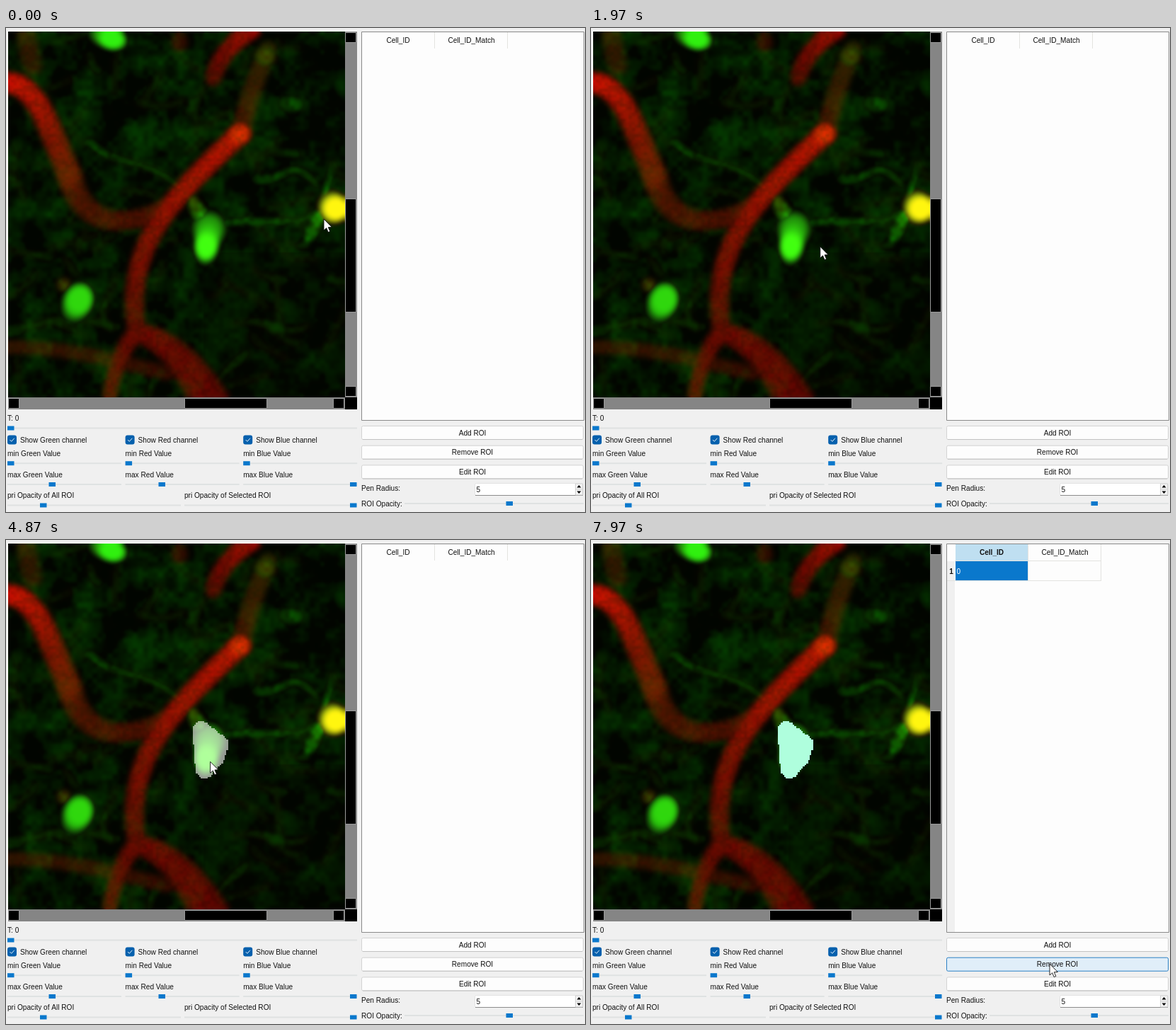
Animation, 818 px wide and 684 px high, one loop 8000 ms. Source, as an HTML page with a canvas:

```html
<!DOCTYPE html>
<html lang="en">
<head>
<meta charset="utf-8">
<title>ROI editor</title>
<style>
html, body { margin: 0; width: 100%; height: 100%; overflow: hidden; background: #f0f0f0; }
canvas { display: block; }
</style>
</head>
<body>
<canvas id="stage" width="818" height="684"></canvas>
<script>
const LOOP = 8000;
const ctx = document.getElementById('stage').getContext('2d');
const FONT = '10.1px "Liberation Sans", Arial, sans-serif';
const BLUE = '#0a78cc';
const VIEW = { x: 3, y: 5, w: 476, h: 517, cell: 2.39 };

// ---------- helpers ----------
function makeCanvas(w, h) {
  const c = document.createElement('canvas');
  c.width = w;
  c.height = h;
  return c;
}

function box(c, x, y, w, h, fill, stroke, r = 0) {
  c.beginPath();
  c.roundRect(x, y, w, h, r);
  if (fill) { c.fillStyle = fill; c.fill(); }
  if (stroke) { c.strokeStyle = stroke; c.lineWidth = 1; c.stroke(); }
}

function label(c, text, x, y, { align = 'left', color = '#111', bold = false } = {}) {
  c.font = (bold ? 'bold ' : '') + FONT;
  c.textAlign = align;
  c.textBaseline = 'alphabetic';
  c.fillStyle = color;
  c.fillText(text, x, y);
}

const mix = (a, b, u) => a + (b - a) * u;
const ease = u => u * u * (3 - 2 * u);

function hash(x, y, seed) {
  let h = Math.imul(x, 374761393) + Math.imul(y, 668265263) + Math.imul(seed, 1442695041);
  h = Math.imul(h ^ (h >>> 13), 1274126177);
  return ((h ^ (h >>> 16)) >>> 0) / 4294967296;
}

function noise(x, y, size, seed) {
  const ix = Math.floor(x / size), iy = Math.floor(y / size);
  const fx = ease(x / size - ix), fy = ease(y / size - iy);
  const row = j => mix(hash(ix, j, seed), hash(ix + 1, j, seed), fx);
  return mix(row(iy), row(iy + 1), fy);
}

// ---------- microscope picture ----------
const W = Math.ceil(VIEW.w / VIEW.cell), H = Math.ceil(VIEW.h / VIEW.cell);

// A cubic curve whose width and colour fade from one end to the other.
function tube(c, [a, b, d, e], width, red, green) {
  for (const [size, glow] of [[1, 0.55], [0.85, 0.8], [0.6, 1]]) {
    for (let u = 0; u <= 1; u += 0.01) {
      const v = 1 - u;
      const [x, y] = [0, 1].map(n =>
        v * v * v * a[n] + 3 * v * v * u * b[n] + 3 * v * u * u * d[n] + u * u * u * e[n]);
      c.fillStyle = `rgb(${mix(...red, u) * glow},${mix(...green, u) * glow},0)`;
      c.beginPath();
      c.arc(x, y, mix(...width, u) * size / 2, 0, 7);
      c.fill();
    }
  }
}

function blob(c, x, y, rx, ry, turn, rgb) {
  const g = c.createRadialGradient(0, 0, 0, 0, 0, 1);
  g.addColorStop(0.55, `rgb(${rgb})`);
  g.addColorStop(1, `rgba(${rgb},0)`);
  c.save();
  c.translate(x, y);
  c.rotate(turn);
  c.scale(rx, ry);
  c.fillStyle = g;
  c.beginPath();
  c.arc(0, 0, 1, 0, 7);
  c.fill();
  c.restore();
}

function layer(blur, paint) {
  const raw = makeCanvas(W, H), c = raw.getContext('2d');
  c.fillStyle = '#000';
  c.fillRect(0, 0, W, H);
  c.scale(1 / VIEW.cell, 1 / VIEW.cell);
  c.translate(-VIEW.x, -VIEW.y);
  c.globalCompositeOperation = 'lighten';
  paint(c);
  const soft = makeCanvas(W, H), s = soft.getContext('2d');
  s.filter = `blur(${blur}px)`;
  s.drawImage(raw, 0, 0);
  return s.getImageData(0, 0, W, H).data;
}

function paintVessels(c) {
  const bend = [91, 210], fork = [186, 432], tip = [332, 150];
  tube(c, [[-8, 76], [45, 76], [55, 130], bend], [30, 36], [190, 88], [10, 16]);
  tube(c, [bend, [105, 280], [175, 295], [245, 240]], [36, 24], [70, 62], [18, 8]);
  tube(c, [tip, [235, 240], [165, 310], fork], [31, 28], [165, 78], [14, 10]);
  tube(c, [fork, [165, 450], [152, 490], [146, 528]], [26, 20], [90, 76], [6, 10]);
  tube(c, [fork, [230, 440], [270, 490], [292, 535]], [28, 58], [94, 84], [5, 3]);
  tube(c, [[-5, 453], [70, 450], [140, 468], [230, 490]], [20, 22], [44, 46], [16, 6]);
  tube(c, [[350, 2], [320, 20], [300, 45], [294, 72]], [27, 24], [135, 70], [6, 4]);
  tube(c, [[372, 30], [355, 70], [345, 100], tip], [26, 28], [36, 60], [30, 14]);
  tube(c, [[28, 4], [30, 20], [33, 35], [38, 55]], [28, 28], [42, 40], [20, 18]);
  blob(c, ...tip, 19, 16, 0, [190, 36, 0]);
  blob(c, 90, 212, 20, 22, 0, [95, 26, 0]);
  blob(c, 246, 20, 14, 18, 0, [48, 8, 0]);
}

function paintFibres(c) {
  const red = [5, 8];
  for (let n = 0; n < 70; n++) {
    const rnd = k => hash(n, k, 9);
    const x = rnd(1) * 480, y = rnd(2) * 520, turn = rnd(3) * 7, len = 25 + 55 * rnd(4);
    const at = (u, bow) => [x + len * u * Math.cos(turn) - bow * Math.sin(turn),
      y + len * u * Math.sin(turn) + bow * Math.cos(turn)];
    const green = 22 + 26 * rnd(5);
    tube(c, [at(0, 0), at(0.3, 24 * rnd(6) - 12), at(0.7, 24 * rnd(7) - 12), at(1, 0)],
      [10, 6], red, [green, green * 0.6]);
  }
  tube(c, [[118, 160], [150, 200], [190, 175], [248, 228]], [10, 8], red, [66, 62]);
  tube(c, [[300, 282], [345, 260], [390, 290], [442, 262]], [9, 6], red, [90, 75]);
  tube(c, [[356, 214], [395, 222], [405, 175], [442, 225]], [10, 7], red, [72, 75]);
  tube(c, [[450, 245], [455, 225], [460, 210], [464, 190]], [9, 5], red, [130, 65]);
  tube(c, [[455, 256], [440, 268], [442, 285], [428, 298]], [16, 12], [30, 8], [160, 105]);
  tube(c, [[-5, 432], [40, 425], [80, 400], [160, 425]], [14, 9], red, [52, 42]);
  tube(c, [[262, 240], [266, 250], [272, 258], [280, 272]], [12, 22], [50, 18], [70, 125]);
  blob(c, 404, 108, 24, 14, 0, [6, 68, 0]);
  blob(c, 368, 40, 18, 17, 0, [52, 52, 0]);
  blob(c, 82, 364, 12, 12, 0, [50, 62, 0]);
}

function paintCells(c) {
  blob(c, 144, 12, 32, 20, 0.35, [34, 140, 18]);
  blob(c, 150, 15, 24, 18, 0.3, [46, 240, 34]);
  blob(c, 288, 285, 28, 29, 0, [30, 145, 24]);
  blob(c, 285, 305, 21, 34, 0.12, [44, 205, 28]);
  blob(c, 284, 309, 18, 23, 0.12, [62, 255, 14]);
  blob(c, 101, 389, 25, 33, 0.35, [32, 160, 18]);
  blob(c, 104, 385, 23, 26, 0.4, [44, 215, 22]);
  blob(c, 463, 254, 24, 27, 0, [130, 165, 5]);
  blob(c, 468, 256, 23, 22, 0, [255, 246, 6]);
}

function buildPicture() {
  const vessels = layer(1.8, paintVessels);
  const fibres = layer(1.5, paintFibres);
  const cells = layer(1.1, paintCells);
  const pic = makeCanvas(W, H), p = pic.getContext('2d');
  const out = p.createImageData(W, H);
  for (let y = 0; y < H; y++) {
    for (let x = 0; x < W; x++) {
      const i = (y * W + x) * 4;
      const fine = noise(x, y, 3, 5);
      const cloud = 0.5 * noise(x, y, 15, 3) + 0.3 * noise(x, y, 6, 4) + 0.2 * fine;
      const haze = 5 + 95 * Math.max(0, cloud - 0.36) * (x > 115 && y > 130 ? 0.7 : 1);
      const grain = 0.86 + 0.28 * noise(x, y, 1.8, 6);
      const veil = 1 - 0.75 * Math.min(vessels[i] / 110, 1);
      const green = vessels[i + 1] + veil * Math.max(haze, fibres[i + 1] * (0.6 + 0.6 * fine));
      out.data[i] = Math.max(vessels[i] * grain, fibres[i], cells[i]) + 5 * cloud;
      out.data[i + 1] = Math.max(green, cells[i + 1]);
      out.data[i + 2] = cells[i + 1] / 16;
      out.data[i + 3] = 255;
    }
  }
  p.putImageData(out, 0, 0);
  return pic;
}

// ---------- pointer ----------
// Places passed: x, y, time of arrival and, where it rests, time of leaving.
const KEYS = [
  [449, 270, 0], [475, 392, 570], [645, 572, 830, 1600], [324, 309, 1970],
  [281, 324, 2370, 2530], [277, 280, 3270, 3370], [276, 269, 3700], [301, 289, 4170, 4200],
  [295, 308, 4480], [289, 314, 4730], [288, 308, 5370, 6430], [299, 311, 7070, 7500],
  [648, 599, 7970, LOOP]
].flatMap(([x, y, from, to]) => to ? [[from, x, y], [to, x, y]] : [[from, x, y]]);

const slope = (i, n) => i < 0 || i >= KEYS.length - 1 ? 0
  : (KEYS[i + 1][n] - KEYS[i][n]) / (KEYS[i + 1][0] - KEYS[i][0]);

// Monotone cubic: smooth through the keys, never overshooting a rest.
function tangent(i, n) {
  const a = slope(i - 1, n), b = slope(i, n);
  return a * b <= 0 ? 0 : 2 * a * b / (a + b);
}

function pointer(t) {
  let i = 0;
  while (i < KEYS.length - 2 && t >= KEYS[i + 1][0]) i++;
  const span = KEYS[i + 1][0] - KEYS[i][0], u = (t - KEYS[i][0]) / span;
  return [1, 2].map(n => mix(KEYS[i][n], KEYS[i + 1][n], ease(u))
    + span * u * (1 - u) * (tangent(i, n) * (1 - u) - tangent(i + 1, n) * u));
}

function drawPointer([x, y]) {
  const shape = [[0, 0], [0, 16], [3.7, 12.7], [6.2, 18.6], [8.8, 17.5], [6.3, 11.7], [11.3, 11.5]];
  ctx.beginPath();
  shape.forEach(([a, b]) => ctx.lineTo(x + a, y + b));
  ctx.closePath();
  ctx.fillStyle = '#fff';
  ctx.fill();
  ctx.strokeStyle = '#111';
  ctx.lineWidth = 0.9;
  ctx.stroke();
}

// ---------- region of interest ----------
const PEN = { from: 2530, to: 4660, radius: 13 };

// Each covered image cell keeps the time at which the pen first reaches it.
function buildMask() {
  const trail = [], cells = [], s = VIEW.cell;
  for (let t = PEN.from; t <= PEN.to; t += 20) trail.push([t, ...pointer(t)]);
  for (let j = 0; j < H; j++) {
    for (let i = 0; i < W; i++) {
      const x = VIEW.x + i * s, y = VIEW.y + j * s;
      const hit = trail.find(p => Math.hypot(x + s / 2 - p[1], y + s / 2 - p[2]) <= PEN.radius);
      if (!hit) continue;
      const left = Math.round(x), top = Math.round(y);
      cells.push([hit[0], left, top, Math.round(x + s) - left, Math.round(y + s) - top]);
    }
  }
  return cells;
}

function drawMask(t, added, selected) {
  ctx.fillStyle = selected ? '#affedd' : added ? 'rgba(172,255,218,.5)' : 'rgba(255,255,255,.58)';
  for (const [born, ...rect] of mask) if (t >= born) ctx.fillRect(...rect);
}

// ---------- window ----------
function slider(c, x0, x1, y, knob) {
  box(c, x0, y - 1, x1 - x0, 2, '#dfe2e2');
  box(c, knob, y - 3, 9.5, 6, BLUE);
}

function checkbox(c, x, text) {
  box(c, x, 575.5, 13, 13, '#0560ad', null, 3);
  c.beginPath();
  c.moveTo(x + 3.5, 582);
  c.lineTo(x + 5.7, 584.3);
  c.lineTo(x + 9.7, 579.8);
  c.strokeStyle = '#e4f0fa';
  c.lineWidth = 1;
  c.stroke();
  label(c, text, x + 18, 586);
}

function scrollBars(c) {
  const part = (x, y, w, h) => box(c, x + 0.5, y + 0.5, w, h, '#000', '#9a9a9a');
  box(c, 479, 5, 17, 517, '#858585');
  box(c, 3, 522, 476, 17, '#858585');
  box(c, 479, 522, 17, 17, '#000');
  for (const y of [6, 506]) part(479, y, 15, 14);
  for (const x of [3, 462]) part(x, 523, 15, 14);
  part(479, 241, 15, 160);
  part(252, 523, 116, 14);
}

function spinBox(c) {
  box(c, 662.5, 643.5, 153, 17, '#fff', '#e2e2e2', 2);
  box(c, 663, 660, 152, 1, '#8c8c8c');
  label(c, '5', 664.5, 656);
  for (const dir of [-1, 1]) {
    const y = 652 + dir * 4;
    box(c, 804.5, y - 4, 10, 8, '#f3f3f3', '#d4d4d4');
    c.fillStyle = '#000';
    c.beginPath();
    c.moveTo(806.5, y - dir * 1.5);
    c.lineTo(812.5, y - dir * 1.5);
    c.lineTo(809.5, y + dir * 2);
    c.fill();
  }
}

function buildWindow() {
  const win = makeCanvas(818, 684), c = win.getContext('2d');
  box(c, 0, 0, 818, 684, '#f0f0f0');
  box(c, 2, 4, 494, 535, '#fff');
  c.imageSmoothingQuality = 'high';
  c.drawImage(buildPicture(), VIEW.x, VIEW.y, VIEW.w, VIEW.h);
  scrollBars(c);

  label(c, 'T: 0', 2, 555);
  slider(c, 2, 496, 565.5, 2);
  ['Green', 'Red', 'Blue'].forEach((name, i) => {
    const x = 2 + 166.6 * i, end = x + 161, knob = [60.5, 215.5, 486][i];
    checkbox(c, x, `Show ${name} channel`);
    label(c, `min ${name} Value`, x, 605);
    slider(c, x, end, 615.2, x);
    label(c, `max ${name} Value`, x, 635);
    slider(c, x, end, 645, knob);
  });
  label(c, 'pri Opacity of All ROI', 2, 664);
  slider(c, 2, 247, 674.5, 48);
  label(c, 'pri Opacity of Selected ROI', 252, 664);
  slider(c, 252, 496, 674.5, 486);

  label(c, 'Pen Radius:', 502, 654);
  spinBox(c);
  label(c, 'ROI Opacity:', 502, 676);
  slider(c, 563, 816, 672, 706.5);
  return win;
}

function drawTable(added, selected) {
  const x = added ? 514 : 502;
  box(ctx, 502.5, 5.5, 314, 549, '#fdfdfd', '#8a8a8a');
  if (added) box(ctx, 503, 30, 11, 524, '#f0f0f0');
  if (selected) {
    box(ctx, 515, 6, 102, 23, '#bfdff1');
    box(ctx, 515, 29.5, 102, 28, BLUE);
  }
  const line = '#e3e3e0', height = added ? 51 : 23;
  box(ctx, x + 103, 6, 1, height, line);
  box(ctx, x + 206, 6, 1, height, line);
  if (added) {
    box(ctx, 514, 29, 207, 1, line);
    box(ctx, 503, 57, 218, 1, line);
    label(ctx, '1', 509, 47.5, { align: 'center', bold: selected });
    label(ctx, '0', 516.5, 47.5, { color: selected ? '#fff' : '#111' });
  }
  label(ctx, 'Cell_ID', x + 52, 21, { align: 'center', bold: selected });
  label(ctx, 'Cell_ID_Match', x + 155.5, 21, { align: 'center' });
}

function drawButton(text, y, [px, py], pressed) {
  const hover = px > 503 && px < 816 && py > y && py < y + 20;
  const fill = hover ? (pressed ? '#cce4f7' : '#e0eef9') : '#fdfdfd';
  box(ctx, 502.5, y + 0.5, 313, 19, fill, hover ? '#2b80c4' : '#d3d3d3', 2);
  if (!hover) box(ctx, 504, y + 19, 310, 1, '#c2c2c2');
  label(ctx, text, 659, y + 13.7, { align: 'center' });
}

const mask = buildMask();
const backdrop = buildWindow();

function draw(t) {
  const added = t >= 6000, selected = t >= 6740;
  const pos = pointer(t);
  const pressed = t >= 1080 && t < 1240;
  ctx.drawImage(backdrop, 0, 0);
  drawMask(t, added, selected);
  drawTable(added, selected);
  ['Add ROI', 'Remove ROI', 'Edit ROI'].forEach((text, i) =>
    drawButton(text, 562 + 27.7 * i, pos, pressed));
  drawPointer(pos);
}

const start = performance.now();
function tick() {
  draw((performance.now() - start) % LOOP);
  requestAnimationFrame(tick);
}
tick();
</script>
</body>
</html>
```
